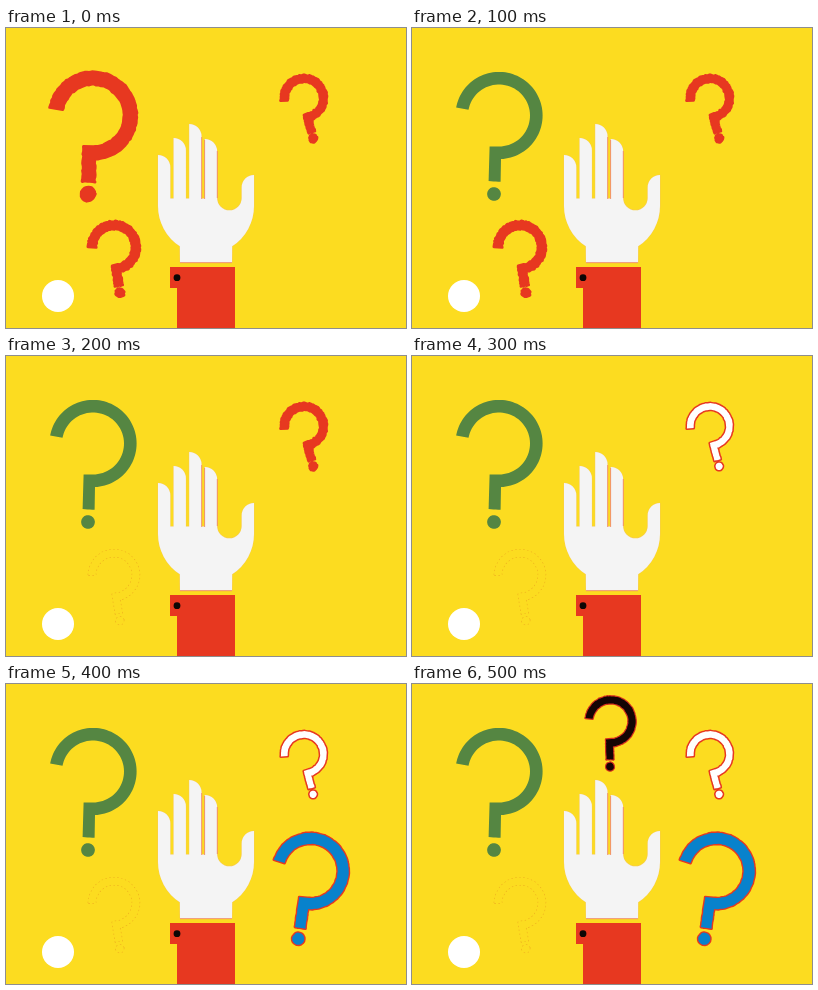
Write an HTML page with a canvas that moves like this. It is 400 px wide and 300 px high and loops after 600 ms.

```html
<!DOCTYPE html>
<html lang="en">
<head>
<meta charset="utf-8">
<title>Raised hand</title>
<style>
html, body { margin: 0; width: 100%; height: 100%; overflow: hidden; background: #fcdc20; }
canvas { display: block; width: 400px; height: 300px; }
</style>
</head>
<body>
<canvas id="stage" width="400" height="300"></canvas>
<script>
const ctx = document.getElementById('stage').getContext('2d');
const YELLOW = '#fcdc20', RED = '#e73820', WHITE = '#f4f4f4';
const STEP = 100, STEPS = 6;
const rad = deg => deg * Math.PI / 180;

function random(seed) {
  return () => (seed = (seed * 16807) % 2147483647) / 2147483647;
}

function arc(r, from, to) {
  const n = Math.ceil(Math.abs(rad(to - from)) * r / 2.5);
  return Array.from({ length: n + 1 }, (_, i) => {
    const a = rad(from + (to - from) * i / n);
    return [r * Math.cos(a), r * Math.sin(a)];
  });
}

function line(x0, y0, x1, y1) {
  const n = Math.ceil(Math.hypot(x1 - x0, y1 - y0) / 2.5);
  return Array.from({ length: n + 1 }, (_, i) =>
    [x0 + (x1 - x0) * i / n, y0 + (y1 - y0) * i / n]);
}

// Question mark around the centre of its bowl
const HOOK = [
  ...arc(43.6, 190.5, 447.5),
  ...line(2, 43.6, 1.6, 66.3),
  ...line(1.6, 66.3, -10.4, 65.6),
  ...line(-10.4, 65.6, -9.4, 31),
  ...arc(31, 450, 190.5)
];
const DOT = arc(6.9, 0, 358).map(([x, y]) => [x - 5, y + 78.5]);

function markPath({ x, y, s, turn }, jitter = 0) {
  const path = new Path2D(), rnd = random(Math.round(x * 31 + y));
  const c = Math.cos(rad(turn)) * s, d = Math.sin(rad(turn)) * s;
  const wobble = () => (rnd() - 0.5) * 2 * jitter;
  for (const part of [HOOK, DOT]) {
    part.forEach(([px, py], i) => {
      const qx = x + px * c - py * d + wobble();
      const qy = y + px * d + py * c + wobble();
      i ? path.lineTo(qx, qy) : path.moveTo(qx, qy);
    });
    path.closePath();
  }
  return path;
}

function paint(path, fill, edge, width, dash = []) {
  ctx.setLineDash(dash);
  ctx.lineJoin = 'round';
  if (edge) {
    ctx.strokeStyle = edge;
    ctx.lineWidth = width;
    ctx.stroke(path);
  }
  ctx.fillStyle = fill;
  ctx.fill(path);
}

// at: step of the final colours; early: rough red before that
const marks = [
  { x: 87, y: 87.5, s: 1, turn: 0, at: 1, early: true, fill: '#558642' },
  { x: 108, y: 219, s: 0.587, turn: -11, at: 2, early: true, fill: YELLOW, edge: '#eda91e', width: 1.1, dash: [1.5, 2.5] },
  { x: 297.8, y: 70.1, s: 0.525, turn: -16.6, at: 3, early: true, fill: '#ffffff', edge: RED, width: 3 },
  { x: 304.5, y: 187, s: 0.875, turn: 6.5, at: 4, fill: '#0882cc', edge: RED, width: 2.8 },
  { x: 198.5, y: 37.3, s: 0.576, turn: -3, at: 5, fill: '#150504', edge: '#d5301c', width: 2.4 }
];
for (const m of marks) {
  m.clean = markPath(m, m.edge ? 0.2 : 0);
  m.rough = markPath(m, 0.5);
}

// Four equal fingers, each with a quarter-round tip
const FINGER = 12.3, PITCH = 15.6, CROTCH = 170.5;
const fingers = [127, 110, 96, 111].map((top, i) => ({ top, x: 152 + i * PITCH }));

function handPath() {
  const path = new Path2D();
  const tip = (x, y) => path.arc(x, y, FINGER, -Math.PI / 2, 0);
  path.moveTo(152, 178);
  for (const { x, top } of fingers) {
    path.lineTo(x, CROTCH);
    path.lineTo(x, top);
    tip(x, top + FINGER);
    path.lineTo(x + FINGER, CROTCH);
  }
  path.arc(223.4, 170, FINGER, Math.PI, 0, true);
  path.arc(248, 147 + FINGER, FINGER, Math.PI, Math.PI * 1.5);
  path.arc(200, 178, 48, 0, rad(57));
  path.lineTo(226, 234.5);
  path.lineTo(174, 234.5);
  path.arc(200, 178, 48, rad(123), Math.PI);
  path.closePath();
  return path;
}
const hand = handPath();
const handLines = new Path2D('M211.3 123V170 M195.7 109V171 M198.6 112V171 M174 234.7H226');

function disc(x, y, r, fill) {
  ctx.fillStyle = fill;
  ctx.beginPath();
  ctx.arc(x, y, r, 0, Math.PI * 2);
  ctx.fill();
}

function drawScene() {
  ctx.fillStyle = YELLOW;
  ctx.fillRect(0, 0, 400, 300);

  paint(hand, WHITE, '#f6c65c', 0.8);
  ctx.strokeStyle = '#ef8068';
  ctx.lineWidth = 0.8;
  ctx.stroke(handLines);

  ctx.fillStyle = RED;
  ctx.fillRect(171, 239, 58, 61);
  ctx.fillRect(164, 239, 8, 21);

  disc(171, 249.7, 3.4, '#0c0605');
  disc(52, 268, 16, '#ffffff');
}

function frame() {
  const step = Math.floor(performance.now() % (STEP * STEPS) / STEP);
  drawScene();
  for (const m of marks) {
    if (step >= m.at) paint(m.clean, m.fill, m.edge, m.width, m.dash);
    else if (m.early) paint(m.rough, RED, RED, 2.9);
  }
  requestAnimationFrame(frame);
}
frame();
</script>
</body>
</html>
```
